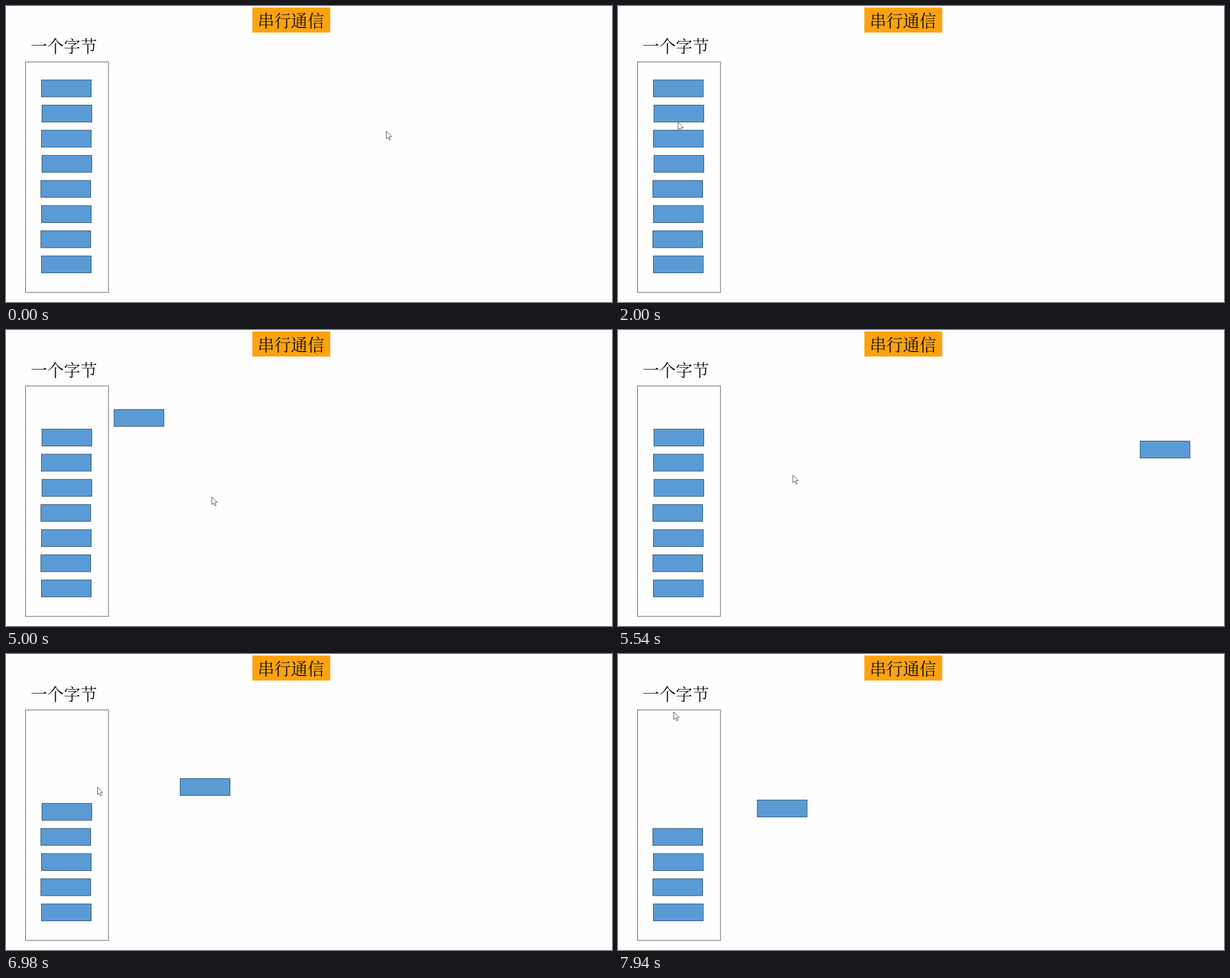
These frames come from a looping animation (1070 px wide and 524 px high, 8 s). An HTML page with a canvas:

```html
<!DOCTYPE html>
<html lang="zh-CN">
<head>
<meta charset="utf-8">
<title>串行通信</title>
<style>
  html, body { margin: 0; width: 100%; height: 100%; overflow: hidden; background: #fefefe; }
  canvas { display: block; }
</style>
</head>
<body>
<canvas id="stage" width="1070" height="524"></canvas>
<script>
const ctx = document.getElementById('stage').getContext('2d');
const LOOP = 8000, FIRST_HOLD = 500, STEP = 60;
const BAR_COUNT = 8, BAR_W = 88, BAR_H = 30;
const FLIGHT = 934, EXIT_X = 965.5;

// Bars leave one after another, each towards the right edge.
const launches = [
  { start: 4751, endY: 200 },
  { start: 5708, endY: 224 },
  { start: 6636, endY: 222 },
  { start: 7643, endY: 235 }
];

const pointerStart = { x: 671, y: 221 };
const pointerMoves = [
  { from: 440, to: 900, x: 215, y: 238 },
  { from: 900, to: 1220, x: 105, y: 350 },
  { from: 1640, to: 1820, x: 104, y: 192 },
  { from: 1900, to: 2240, x: 109, y: 236 },
  { from: 3620, to: 3680, x: 118, y: 265 },
  { from: 3680, to: 3740, x: 149, y: 306 },
  { from: 3860, to: 4160, x: 260, y: 242 },
  { from: 4160, to: 4520, x: 363, y: 295 },
  { from: 5400, to: 5960, x: 144, y: 140 },
  { from: 6440, to: 6980, x: 161, y: 235 },
  { from: 7220, to: 7940, x: 98, y: 102 }
];

const lerp = (a, b, u) => a + (b - a) * u;
const progress = (time, from, to) => Math.min(1, Math.max(0, (time - from) / (to - from)));
const easeInOut = u => u < 0.5 ? 2 * u * u : 1 - 2 * (1 - u) ** 2;

function pointerAt(time) {
  return pointerMoves.reduce((pos, move) => {
    const u = progress(time, move.from, move.to);
    return { x: lerp(pos.x, move.x, u), y: lerp(pos.y, move.y, u) };
  }, pointerStart);
}

function barAt(index, time) {
  const home = {
    x: 62.5 + index % 2 - (index >= BAR_COUNT / 2 ? 1 : 0),
    y: 130.9 + index * 44.5
  };
  const launch = launches[index];
  if (!launch) return home;
  const u = easeInOut(progress(time, launch.start, launch.start + FLIGHT));
  return { x: lerp(home.x, EXIT_X, u), y: lerp(home.y, launch.endY, u) };
}

function drawText(text, x, baseline) {
  ctx.font = '300 29.3px "Noto Serif CJK SC", "Noto Sans CJK SC", "Noto Sans CJK", serif';
  ctx.fillStyle = '#111';
  ctx.fillText(text, x, baseline);
}

function drawBars(time) {
  ctx.fillStyle = '#5b9bd5';
  ctx.strokeStyle = '#304e67';
  for (let i = 0; i < BAR_COUNT; i++) {
    const next = launches[i + 1];
    if (next && time >= next.start) continue;
    const { x, y } = barAt(i, time);
    ctx.fillRect(x, y, BAR_W, BAR_H);
    ctx.strokeRect(x, y, BAR_W, BAR_H);
  }
}

function drawPointer({ x, y }) {
  const arrow = new Path2D('M0 0V13.5L3 10.8 5.2 15.8 7.4 14.8 5.3 10 9.5 9.7Z');
  ctx.save();
  ctx.translate(x + 0.5, y + 0.5);
  ctx.fillStyle = '#fff';
  ctx.strokeStyle = '#555';
  ctx.fill(arrow);
  ctx.stroke(arrow);
  ctx.restore();
}

function draw(time) {
  ctx.fillStyle = '#fefefe';
  ctx.fillRect(0, 0, 1070, 524);
  ctx.fillStyle = '#fea30f';
  ctx.fillRect(435, 2.5, 137.5, 44.5);
  drawText('串行通信', 444.5, 37);
  drawText('一个字节', 43.5, 82);
  ctx.strokeStyle = '#555';
  ctx.strokeRect(34.5, 99, 146.5, 408);
  drawBars(time);
  drawPointer(pointerAt(time));
}

function tick() {
  const t = performance.now() % LOOP;
  draw(t < FIRST_HOLD ? 0 : FIRST_HOLD + Math.floor((t - FIRST_HOLD) / STEP) * STEP);
  requestAnimationFrame(tick);
}
tick();
</script>
</body>
</html>
```
